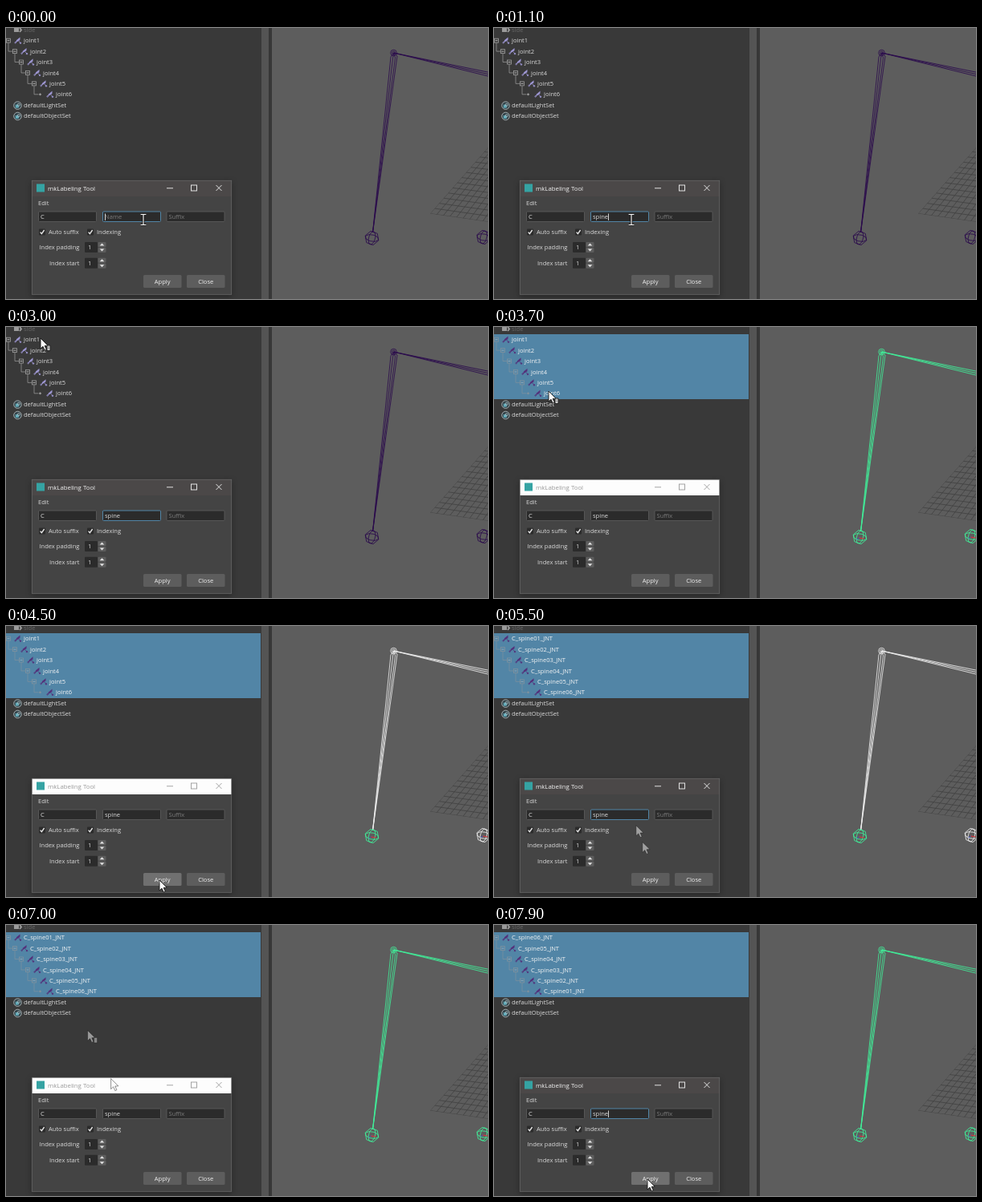
These frames come from a looping animation (600x338 px, 8000 ms). An HTML page with a canvas:

```html
<!DOCTYPE html>
<html lang="en">
<head>
<meta charset="utf-8">
<title>Joint labeling</title>
<style>
html, body { margin: 0; width: 100%; height: 100%; overflow: hidden; background: #393939; }
canvas { display: block; width: 100vw; height: 100vh; }
</style>
</head>
<body>
<canvas id="stage"></canvas>
<script>
const W = 600, H = 338, LOOP = 8000;
const canvas = document.getElementById('stage');
const ctx = canvas.getContext('2d');
const dpr = window.devicePixelRatio || 1;
canvas.width = W * dpr;
canvas.height = H * dpr;

const PURPLE = '#2a0a4c', GREEN = '#40f09a', WHITE = '#f0f0f0';
const BLUE = '#5285a6', DIM = '#414f5b';
const FONT = '"Open Sans", "Noto Sans", sans-serif', SIZE = 7.55;
const ROW = 13.42, FIRST = 15.7;

// Moments of the interaction
const TYPE = 300, KEY = 150;
const PICK_ROOT = 3200, PICK_ALL = 3700, APPLY_1 = 4800;
const PICK_TIP = 6150, PICK_BACK = 6700, APPLY_2 = 7500;

// Pointer path: time, x, y
const PATH = [
  [0, 171, 239], [1950, 171, 239], [2250, 140, 150], [2700, 43, 14],
  [3250, 43, 14], [3600, 68, 80], [3850, 68, 80], [4200, 145, 225],
  [4500, 191, 317], [5250, 191, 317], [5500, 177, 249], [6000, 65, 81],
  [6250, 65, 81], [6400, 72, 34], [6600, 45, 14], [6750, 45, 14],
  [7200, 191, 317], [8000, 191, 317]
];

function slope(k, axis) {
  const a = PATH[k - 1], b = PATH[k], c = PATH[k + 1];
  if (!a || !c) return 0;
  const still = (p, q) => p[1] === q[1] && p[2] === q[2];
  if (still(a, b) || still(b, c)) return 0;
  return (c[axis] - a[axis]) / (c[0] - a[0]);
}

function pointer(t) {
  t = Math.max(0, t);
  let k = 0;
  while (k < PATH.length - 2 && PATH[k + 1][0] <= t) k++;
  const a = PATH[k], b = PATH[k + 1], d = b[0] - a[0];
  const u = (t - a[0]) / d, u2 = u * u, u3 = u2 * u;
  return [1, 2].map(i =>
    (2 * u3 - 3 * u2 + 1) * a[i] + (u3 - 2 * u2 + u) * d * slope(k, i) +
    (3 * u2 - 2 * u3) * b[i] + (u3 - u2) * d * slope(k + 1, i));
}

function selection(t) {
  if (t < PICK_ROOT) return 'none';
  if (t < PICK_ALL) return 'root';
  if (t < PICK_TIP) return 'down';
  return t < PICK_BACK ? 'tip' : 'up';
}

function rect(x, y, w, h, fill) {
  ctx.fillStyle = fill;
  ctx.fillRect(x, y, w, h);
}

function box(x, y, w, h, fill, stroke, r = 1) {
  ctx.beginPath();
  ctx.roundRect(x, y, w, h, r);
  ctx.fillStyle = fill;
  ctx.fill();
  if (stroke) {
    ctx.strokeStyle = stroke;
    ctx.lineWidth = 1;
    ctx.stroke();
  }
}

function line(color, width, ...pts) {
  ctx.beginPath();
  for (let i = 0; i < pts.length; i += 2) ctx.lineTo(pts[i], pts[i + 1]);
  ctx.strokeStyle = color;
  ctx.lineWidth = width;
  ctx.stroke();
}

function shape(fill, ...pts) {
  ctx.beginPath();
  for (let i = 0; i < pts.length; i += 2) ctx.lineTo(pts[i], pts[i + 1]);
  ctx.closePath();
  ctx.fillStyle = fill;
  ctx.fill();
}

function ring(x, y, r, color, width, fill) {
  ctx.beginPath();
  ctx.arc(x, y, r, 0, 7);
  if (fill) { ctx.fillStyle = fill; ctx.fill(); }
  ctx.strokeStyle = color;
  ctx.lineWidth = width;
  ctx.stroke();
}

// y is the middle of the lowercase letters
function text(s, x, y, color = '#dadada', align = 'left', size = SIZE) {
  ctx.font = size + 'px ' + FONT;
  ctx.textAlign = align;
  ctx.fillStyle = color;
  ctx.fillText(s, x, y + 2.6);
}

function boneIcon(x, y, selected) {
  const c = selected ? '#54307a' : '#9d96d2';
  shape(c, x + 2.6, y - 4.2, x + 2.4, y - 0.8, x - 3.6, y + 3, x - 1.8, y - 0.6);
  ring(x - 3.4, y + 2.6, 0.8, c, 0.8);
  ring(x + 3, y + 3, 0.8, c, 0.8, c);
  line(c, 0.8, x + 0.8, y + 0.4, x + 3, y + 3);
}

function setIcon(y) {
  ring(14.5, y, 4.8, '#aeb6b8', 0.9, '#34444a');
  rect(11.8, y - 1, 4, 4, '#62aab8');
  ring(15.8, y - 0.8, 1.6, '#c4d0d2', 0.7);
}

function rowName(t, i) {
  if (t < APPLY_1) return 'joint' + (i + 1);
  return 'C_spine0' + (t < APPLY_2 ? i + 1 : 6 - i) + '_JNT';
}

function rowFill(sel, i) {
  if (sel === 'down' || sel === 'up') return BLUE;
  if (sel === 'root') return i ? null : BLUE;
  if (sel === 'tip') return i === 5 ? BLUE : DIM;
  return null;
}

function outliner(t) {
  const sel = selection(t);
  rect(0, 0, 318, H, '#393939');
  rect(10, 0, 6, 5, '#9a9a9a');
  line('#9a9a9a', 2, 17, 0, 19, 2.5, 17, 5);
  text('side', 22, 2.3, '#686868');

  for (let i = 0; i < 6; i++) {
    const fill = rowFill(sel, i);
    const top = Math.round(FIRST + ROW * (i - 0.5));
    const bottom = Math.round(FIRST + ROW * (i + 0.5));
    if (fill) rect(0, top, 317, bottom - top, fill);
  }
  for (let i = 0; i < 6; i++) {
    const y = FIRST + ROW * i, x = 3 + 8 * i, lit = rowFill(sel, i) === BLUE;
    const c = lit ? '#80929e' : '#a0a0a0';
    if (i < 5) {
      line(c, 0.7, x, y + 2.7, x, y + ROW, x + 5.4, y + ROW);
      ctx.strokeStyle = c;
      ctx.lineWidth = 0.8;
      ctx.strokeRect(x - 2.5, y - 2.5, 5, 5);
      line(lit ? '#a8b4bc' : '#d8d8d8', 0.8, x - 1.5, y, x + 1.5, y);
    } else {
      ring(x - 0.5, y, 1, c, 0.8, c);
    }
    boneIcon(15 + 8 * i, y, lit);
    text(rowName(t, i), 22 + 8 * i, y, lit ? '#f4f4f4' : '#dadada');
  }
  ['defaultLightSet', 'defaultObjectSet'].forEach((s, i) => {
    const y = FIRST + ROW * (6 + i);
    setIcon(y + 0.4);
    text(s, 22, y);
  });
  rect(318, 0, 9, H, '#545454');
  rect(327, 0, 4, H, '#373737');
}

function grid() {
  ctx.save();
  ctx.beginPath();
  ctx.moveTo(528, 231.5);
  ctx.lineTo(601, 148);
  ctx.lineTo(601, 242);
  ctx.closePath();
  ctx.clip();
  for (let i = 0; i <= 13; i++) {
    const u = i / 13, x = 528 + 73 * u, y = 231.5 - 83.5 * u;
    line('#414141', 0.8, x, y, x + 80, y + 80 * (0.143 - 0.03 * u));
  }
  for (let i = 0; i <= 9; i++) {
    const x = 528 + 8.2 * i, y = 231.5 + 1.17 * i;
    line('#414141', 0.8, x, y, x + 80, y - 80 * (1.144 + 0.035 * i));
  }
  ctx.restore();
}

function joint(x, y, color, axes) {
  const loop = (n, rx, ry, turn, tilt) => {
    ctx.beginPath();
    for (let i = 0; i < n; i++) {
      const a = turn + i * 2 * Math.PI / n;
      const px = rx * Math.cos(a), py = ry * Math.sin(a);
      ctx.lineTo(x + px * Math.cos(tilt) - py * Math.sin(tilt),
                 y + px * Math.sin(tilt) + py * Math.cos(tilt));
    }
    ctx.closePath();
    ctx.strokeStyle = color;
    ctx.lineWidth = 0.85;
    ctx.stroke();
  };
  loop(6, 8.8, 8.8, 0.35, 0);
  loop(8, 8.6, 4.2, 0.2, 0.2);
  loop(8, 4.2, 8.6, 0.4, 0.25);
  if (axes) {
    line('#e0343c', 1.2, x - 1, y + 1, x + 5, y + 2);
    line('#4456d8', 0.9, x - 1, y + 1, x - 4, y + 3);
  }
}

function viewport(t) {
  const sel = selection(t - 90);
  const bones = { none: PURPLE, tip: PURPLE, down: WHITE, root: GREEN, up: GREEN }[sel];
  const tip = sel === 'none' ? PURPLE : GREEN;
  rect(331, 0, 269, H, '#5d5d5d');
  grid();
  ring(482.5, 31, 3.8, bones, 0.8);
  ring(482.5, 31, 2, bones, 0.8);
  for (const [x, y] of [[479, 36], [481.5, 38], [484.5, 37], [487, 35]]) {
    line(bones, 0.8, 482.5, 31, x, y, 456.5, 255);
  }
  for (const end of [55.5, 58, 60.5]) line(bones, 0.85, 482.5, 31, 602, end);
  joint(455.5, 262, tip, sel !== 'none');
  joint(594.5, 261, bones, sel !== 'none' && sel !== 'tip');
}

function field(x, value, hint, focus) {
  box(x + 0.5, 229, 72, 12.5, '#2b2b2b', focus ? BLUE : '#565656');
  text(value || hint, x + 3, 235.8, value ? '#dcdcdc' : '#7c7c7c');
}

function check(x, label) {
  box(x, 250.5, 8, 8, '#2b2b2b', null, 1);
  line('#e8e8e8', 1.4, x + 1.6, 254.6, x + 3.4, 256.6, x + 6.6, 252);
  text(label, x + 12, 254.6);
}

function spinner(y, label) {
  text(label, 91.5, y, '#dadada', 'right');
  box(98, y - 6.5, 16, 13, '#2b2b2b', null, 1);
  text('1', 102, y);
  for (const s of [-1, 1]) {
    box(114.5, s < 0 ? y - 6.5 : y + 0.4, 10, 6.1, '#5d5d5d', null, 1);
    shape('#e4e4e4', 116.7, y + s * 2, 122.3, y + s * 2, 119.5, y + s * 5);
  }
}

function button(x, label, hover) {
  box(x, 308, 47.5, 16, hover ? '#707070' : '#5d5d5d', null, 1.5);
  text(label, x + 23.7, 316, '#f0f0f0', 'center');
}

function dialog(t) {
  const focus = t < PICK_ROOT || (t >= APPLY_1 && t < PICK_TIP) || t >= APPLY_2;
  const typed = Math.max(0, Math.min(5, Math.floor((t - TYPE) / KEY) + 1));
  const value = 'spine'.slice(0, typed);
  const [px, py] = pointer(t);

  ctx.save();
  ctx.shadowColor = 'rgba(0,0,0,0.35)';
  ctx.shadowBlur = 7 * dpr;
  ctx.shadowOffsetY = 2 * dpr;
  rect(32, 190, 249, 142.5, '#444444');
  ctx.restore();
  rect(32, 190, 249, 20, focus ? '#4b4848' : '#fdfdfd');
  ctx.strokeStyle = '#666666';
  ctx.lineWidth = 0.8;
  ctx.strokeRect(32.3, 190.3, 248.4, 142);

  const ink = focus ? '#f2f2f2' : '#9a9a9a';
  rect(38, 194.5, 10, 10, '#35a3a3');
  text('mkLabeling Tool', 52, 200, ink, 'left', 7.8);
  line(ink, 0.9, 200, 199.8, 208, 199.8);
  ctx.strokeStyle = ink;
  ctx.strokeRect(230.5, 196, 7, 7);
  line(ink, 0.9, 261.5, 196, 268.5, 203);
  line(ink, 0.9, 268.5, 196, 261.5, 203);

  text('Edit', 40, 218.3);
  field(40, 'C', '', false);
  field(120, value, 'Name', focus);
  field(199.5, '', 'Suffix', false);

  const lastKey = t >= APPLY_2 ? APPLY_2 : t >= APPLY_1 ? APPLY_1
    : typed ? TYPE + KEY * (typed - 1) : 0;
  if (focus && (t - lastKey) % 1060 < 530) {
    ctx.font = SIZE + 'px ' + FONT;
    rect(123 + ctx.measureText(value).width, 231.5, 0.9, 8.5, '#e6e6e6');
  }

  check(41, 'Auto suffix');
  check(101, 'Indexing');
  spinner(273.6, 'Index padding');
  spinner(293.2, 'Index start');
  button(171, 'Apply', px > 171 && px < 218 && py > 308 && py < 324);
  button(225, 'Close', false);
}

function drawPointer(x, y, alpha) {
  const inField = y > 229 && y < 242 &&
    [40, 120, 200].some(f => x > f && x < f + 72);
  ctx.save();
  ctx.globalAlpha = alpha;
  ctx.translate(x, y);
  if (inField) {
    for (const [c, w] of [['#151515', 3], ['#f4f4f4', 1.2]]) {
      line(c, w, 0, -6.5, 0, 6.5);
      line(c, w, -3.4, -6.5, 3.4, -6.5);
      line(c, w, -3.4, 6.5, 3.4, 6.5);
    }
  } else {
    shape('#fafafa', 0, 0, 0, 13, 3, 10.2, 5.2, 15, 7.3, 14, 5.2, 9.4, 9.2, 9.2);
    ctx.strokeStyle = '#151515';
    ctx.lineWidth = 0.9;
    ctx.stroke();
    if (x < 318 && y < 190) {
      box(8, 9, 4, 6.5, '#e4e4e4', '#222', 0);
      line('#555', 0.7, 9, 11, 11, 11);
      line('#555', 0.7, 9, 13, 11, 13);
    }
  }
  ctx.restore();
}

function draw(t) {
  ctx.setTransform(dpr, 0, 0, dpr, 0, 0);
  ctx.clearRect(0, 0, W, H);
  outliner(t);
  viewport(t);
  dialog(t);
  const now = pointer(t), before = pointer(t - 60);
  if (Math.hypot(now[0] - before[0], now[1] - before[1]) > 14) {
    drawPointer(...before, 0.5);
    drawPointer(...now, 0.5);
  } else {
    drawPointer(...now, 1);
  }
}

const start = performance.now();
function tick() {
  draw((performance.now() - start) % LOOP);
  requestAnimationFrame(tick);
}
tick();
</script>
</body>
</html>
```
